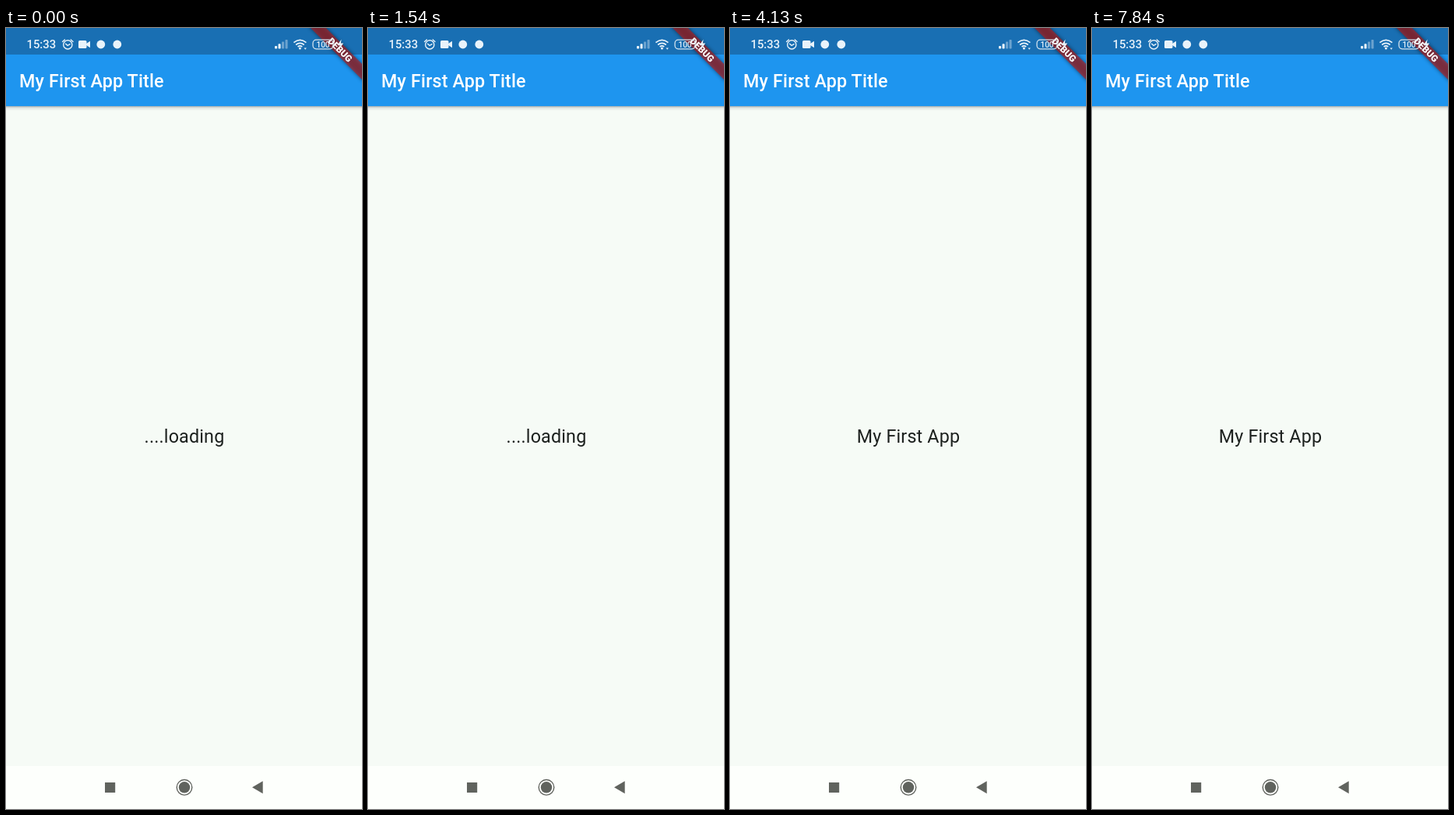
Recreate the animation shown at these times as an HTML page. Size 457 by 1000 pixels, loop 8820 ms.

```html
<!DOCTYPE html>
<html lang="en">
<head>
<meta charset="utf-8">
<title>App loading</title>
<style>
  html, body { margin: 0; width: 100%; height: 100%; overflow: hidden; background: #f6fbf6; }
  svg { display: block; width: 100%; height: 100%; }
  text { font-family: Roboto, "Noto Sans", sans-serif; }
  .label { font-size: 23.3px; letter-spacing: .17px; }
</style>
</head>
<body>
<svg viewBox="0 0 457 1000">
  <defs>
    <linearGradient id="shade" x2="0" y2="1">
      <stop offset="0" stop-color="#65717b" stop-opacity=".6"/>
      <stop offset=".4" stop-color="#8a9297" stop-opacity=".2"/>
      <stop offset="1" stop-color="#8a9297" stop-opacity="0"/>
    </linearGradient>
    <filter id="blur" x="-20%" y="-100%" width="140%" height="300%">
      <feGaussianBlur stdDeviation="2.6"/>
    </filter>
  </defs>

  <rect width="457" height="1000" fill="#f6fbf6"/>
  <rect y="100" width="457" height="6" fill="url(#shade)"/>
  <rect width="457" height="100" fill="#1e95ef"/>
  <rect width="457" height="34" fill="#196fb3"/>
  <text class="label" x="17" y="76" font-weight="500" fill="#fff">My First App Title</text>

  <g transform="translate(457 0) rotate(45)">
    <rect x="-50" y="32.6" width="100" height="14" fill="#000" opacity=".5" filter="url(#blur)"/>
    <rect x="-50" y="32.6" width="100" height="14" fill="#b71c1c" opacity=".63"/>
    <text y="43.8" font-size="11.9" font-weight="900" text-anchor="middle" fill="#fff">DEBUG</text>
  </g>

  <!-- status icons -->
  <g fill="#e9f3fa">
    <text x="26.5" y="26" font-size="14.8" font-weight="500">15:33</text>
    <g fill="none" stroke="#e9f3fa" stroke-width="1.4" stroke-linecap="round">
      <circle cx="79.3" cy="21.4" r="5.6"/>
      <path d="M76.6 20.2l2.5 2.3 3-1.8M72.6 17.6l2.8-2.6M86 17.6l-2.8-2.6"/>
    </g>
    <rect x="93" y="16" width="10.5" height="10" rx="1.6"/>
    <path d="M103 20l5-3.2v8.4l-5-3.2z"/>
    <circle cx="121.8" cy="21" r="5.4"/>
    <circle cx="142.8" cy="21" r="5.4"/>

    <g id="bars"></g>

    <g fill="none" stroke="#e9f3fa" stroke-width="1.7">
      <path d="M369.4 18.6q8-6.6 16 0M372.1 21.5q5.3-4.4 10.6 0M374.6 24q2.8-2.2 5.6 0"/>
    </g>
    <circle cx="377.4" cy="26" r="1.5"/>
    <path d="M382.5 25.5h3.4l-1.7 2.2z"/>

    <rect x="394" y="15.2" width="26" height="11.6" rx="4.2" fill="none" stroke="#d5e4ee" stroke-width="1.3"/>
    <path d="M421.6 18.6q2 2.4 0 4.8z"/>
    <text x="407" y="24.6" font-size="10" font-weight="500" text-anchor="middle">100</text>
    <path d="M430.6 14.5l-5.2 7.4h3.4l-1.2 5.3 5.6-7.6h-3.4z"/>
  </g>

  <text id="message" class="label" x="229" y="531" text-anchor="middle" fill="#1c201e"></text>

  <!-- navigation bar -->
  <rect y="945" width="457" height="55" fill="#fdfffc"/>
  <g fill="#60635e">
    <rect x="127" y="966" width="13.2" height="13"/>
    <circle cx="229" cy="972.3" r="7.2"/>
    <circle cx="229" cy="972.3" r="9.8" fill="none" stroke="#60635e" stroke-width="1.4"/>
    <path d="M316 972.2l13.7-8v16z"/>
  </g>
</svg>
<script>
  const LOOP = 8820, READY = 4130;
  const message = document.getElementById("message");

  document.getElementById("bars").innerHTML = [0, 1, 2, 3].map(i => {
    const h = 3.6 + i * 2.7;
    return `<rect x="${345 + i * 4.5}" y="${26.6 - h}" width="3.1" height="${h}" rx=".8" opacity="${i < 2 ? 1 : .4}"/>`;
  }).join("");

  function draw(time) {
    const text = time % LOOP < READY ? "....loading" : "My First App";
    if (message.textContent !== text) message.textContent = text;
  }

  const start = performance.now();
  function tick() {
    draw(performance.now() - start);
    requestAnimationFrame(tick);
  }
  tick();
</script>
</body>
</html>
```
